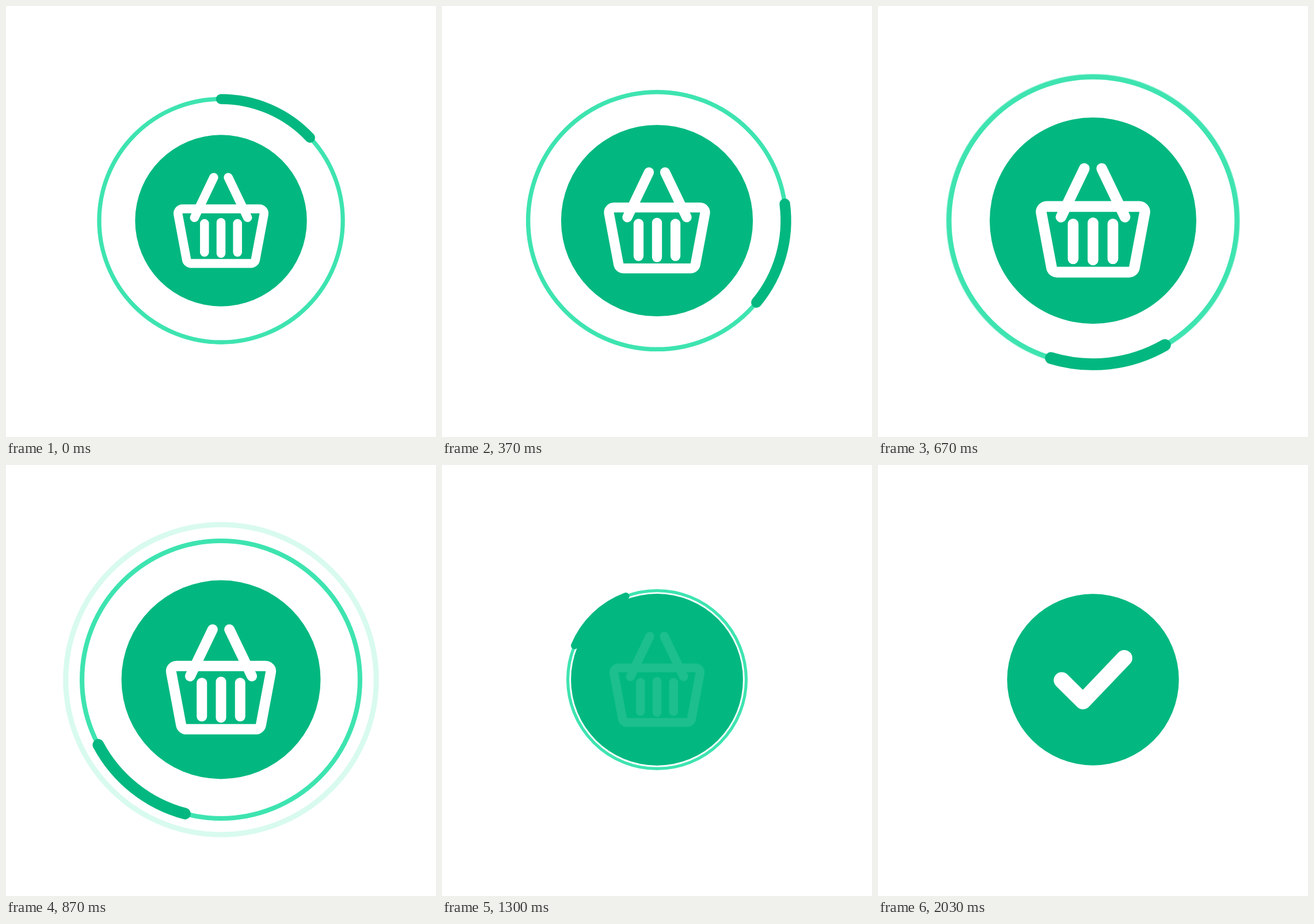
Recreate the animation shown at these times as an HTML page with a canvas. Size 747x750 px, loop 2.16 s.

```html
<!DOCTYPE html>
<html lang="en">
<head>
<meta charset="utf-8">
<title>Basket to check</title>
<style>
  html, body { margin: 0; width: 100%; height: 100%; overflow: hidden; background: #fff; }
  canvas { display: block; }
</style>
</head>
<body>
<canvas id="stage" width="747" height="750"></canvas>
<script>
const ctx = document.getElementById('stage').getContext('2d');
const LOOP = 2160, LAST = 61, CENTER = 373.5;
const GREEN = [2, 184, 128], MINT = [62, 228, 176], WHITE = [255, 255, 255];
const RAD = Math.PI / 180;

const rgb = c => `rgb(${c.map(Math.round).join(',')})`;
const lerp = (a, b, k) => a + (b - a) * k;
const mix = (a, b, k) => a.map((v, i) => lerp(v, b[i], k));
const clamp = k => Math.min(1, Math.max(0, k));
const part = (n, from, to) => clamp((n - from) / (to - from));
const smooth = k => k * k * (3 - 2 * k);
const easeOut = k => 1 - (1 - k) ** 3;

// Slow start, quick finish: cubic bezier (.617, 0, .848, 1)
function swing(x) {
  let lo = 0, hi = 1, u = 0.5;
  for (let i = 0; i < 24; i++) {
    u = (lo + hi) / 2;
    const v = 1 - u;
    if (3 * u * v * v * 0.617 + 3 * u * u * v * 0.848 + u ** 3 < x) lo = u;
    else hi = u;
  }
  return smooth(u);
}

// Rises until tick 20, falls until tick 40
const upDown = (n, a, b, c, ease) =>
  n <= 20 ? lerp(a, b, ease(part(n, 0, 20))) : lerp(b, c, ease(part(n, 20, 40)));

function line(color, width, ...points) {
  ctx.strokeStyle = color;
  ctx.lineWidth = width;
  ctx.beginPath();
  points.forEach(([x, y]) => ctx.lineTo(x, y));
  ctx.stroke();
}

function arc(r, width, color, from = 0, to = 360, alpha = 1) {
  ctx.globalAlpha = alpha;
  ctx.strokeStyle = rgb(color);
  ctx.lineWidth = width;
  ctx.beginPath();
  ctx.arc(0, 0, r, (from - 90) * RAD, (to - 90) * RAD);
  ctx.stroke();
  ctx.globalAlpha = 1;
}

const ring = (r, alpha = 1) => arc(r, r * 0.0335, MINT, 0, 360, alpha);

function ripple(n, start, end, r0, r1) {
  if (n < start || n >= end) return;
  const k = part(n, start, end);
  ring(lerp(r0, r1, easeOut(k)), 0.5 * (1 - k));
}

function basket(color) {
  const w = 15.5;
  ctx.strokeStyle = color;
  ctx.lineWidth = w;
  ctx.beginPath();
  ctx.moveTo(0, -20.5);
  ctx.arcTo(76.4, -20.5, 58.6, 74.5, 8);
  ctx.arcTo(58.6, 74.5, -58.6, 74.5, 8);
  ctx.arcTo(-58.6, 74.5, -76.4, -20.5, 8);
  ctx.arcTo(-76.4, -20.5, 0, -20.5, 8);
  ctx.closePath();
  ctx.stroke();
  for (const s of [-1, 1]) {
    line(color, w, [12.6 * s, -75.3], [46.2 * s, -5.2]);
    line(color, w, [28.7 * s, 4.9], [28.7 * s, 55.1]);
  }
  line(color, w, [0, 3.2], [0, 56.9]);
}

function check(k) {
  const a = [-54.3, 1], b = [-17.3, 37.7], c = [54.3, -37.5];
  const bend = 0.335;
  const along = (p, q, f) => [lerp(p[0], q[0], f), lerp(p[1], q[1], f)];
  const points = [a, along(a, b, clamp(k / bend))];
  if (k > bend) points.push(along(b, c, (k - bend) / (1 - bend)));
  line('#fff', 28, ...points);
}

function draw(n) {
  ctx.setTransform(1, 0, 0, 1, 0, 0);
  ctx.fillStyle = '#fff';
  ctx.fillRect(0, 0, 747, 750);
  ctx.translate(CENTER, CENTER);
  ctx.lineCap = ctx.lineJoin = 'round';

  if (n <= 40) {
    const r = upDown(n, 211.6, 250, 152, swing);
    ripple(n, 0, 10, 211.6, 253.5);
    ripple(n, 20, 30, 251.2, 271);
    ring(r);
    arc(r, r * 0.0825, GREEN, n * 7.5, n * 7.5 + 47);
  } else if (n < LAST) {
    ring(lerp(152, 198.5, easeOut(part(n, 40, 60))), (1 - part(n, 40, LAST)) ** 1.25);
  }

  const scale = upDown(n, 1, 1.203, 1, smooth);
  ctx.scale(scale, scale);
  ctx.fillStyle = rgb(GREEN);
  ctx.beginPath();
  ctx.arc(0, 0, 149.2, 0, 2 * Math.PI);
  ctx.fill();

  if (n < 40) basket(rgb(mix(WHITE, GREEN, smooth(part(n, 35, 40)))));
  else if (n > 40) check(smooth(part(n, 40, 48)));
}

// Thirty ticks a second, each starting on a multiple of 10 ms
function tick(t) {
  let n = Math.ceil(t * 0.03) + 1;
  while (Math.round(n * 10 / 3) * 10 > t) n--;
  return Math.min(n, LAST);
}

const begin = performance.now();
function frame() {
  draw(tick(Math.max(0, performance.now() - begin) % LOOP));
  requestAnimationFrame(frame);
}
frame();
</script>
</body>
</html>
```
